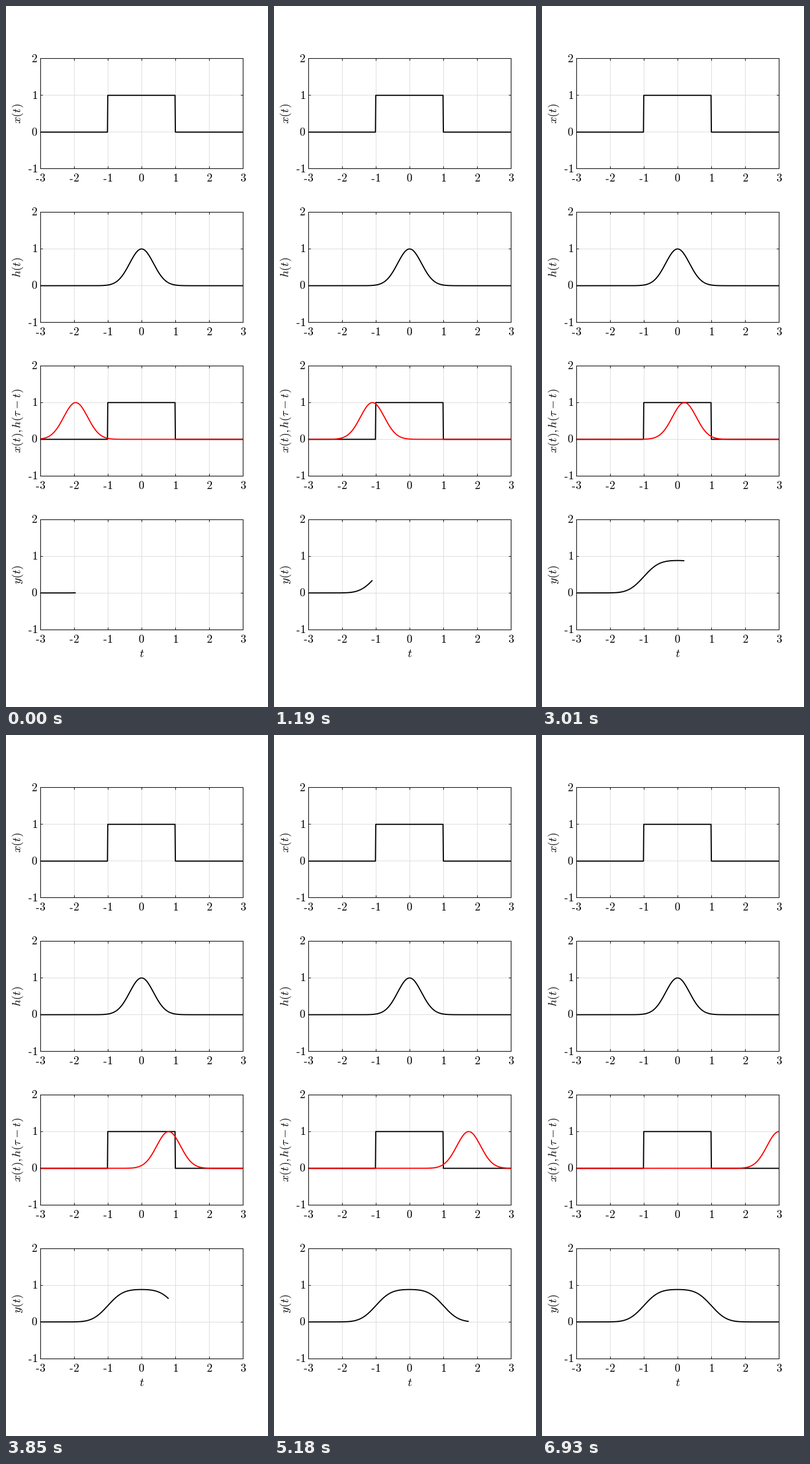
A matplotlib script for the animation above (7000 ms loop, 458 by 1222 pixels).

```python
import math

import matplotlib.pyplot as plt
import numpy as np
from matplotlib.animation import FuncAnimation
from matplotlib.lines import Line2D
from matplotlib.transforms import Affine2D

W, H, DPI = 458, 1222, 100
PT = 72 / DPI                       # points per pixel
LEFT, RIGHT = 59.8, 414.2
TOP, UNIT, STEP = 91.6, 64.1, 267.8  # first panel top, pixels per y unit, panel pitch
TICK_EM, LABEL_EM = 20, 20.6
FRAMES, INTERVAL = 100, 70

plt.rcParams["mathtext.fontset"] = "cm"
fig = plt.figure(figsize=(W / DPI, H / DPI), dpi=DPI, facecolor="white")


def put(x, y, s, em, **kw):
    """Math text centred on x with its baseline at y, in pixels from the top left."""
    fig.text(x / W, 1 - y / H, s, fontsize=em * PT, color="black",
             ha="center", va="baseline", **kw)


def number(x, y, n):
    """Tick number whose digit is centred on x; a hyphen serves as minus."""
    put(x, y, rf"$\mathrm{{{abs(n)}}}$", TICK_EM)
    if n < 0:
        mid = x - 0.44 * TICK_EM
        half = 0.133 * TICK_EM
        level = 1 - (y - 0.216 * TICK_EM) / H
        fig.add_artist(Line2D([(mid - half) / W, (mid + half) / W], [level, level],
                              color="black", lw=1.3 * PT, solid_capstyle="butt"))


def panel(k, label):
    top = TOP + STEP * k
    bottom = top + 3 * UNIT
    # Half a pixel up, so that the frame and grid snap to the pixel row they lie in.
    ax = fig.add_axes([LEFT / W, 1 - (bottom - 0.5) / H,
                       (RIGHT - LEFT) / W, 3 * UNIT / H])
    ax.set(xlim=(-3, 3), ylim=(-1, 2), xticks=range(-3, 4), yticks=range(-1, 3))
    ax.patch.set_visible(False)
    ax.set_axisbelow(True)
    ax.grid(color="#dcdcdc", lw=PT)
    ax.tick_params(direction="in", length=3.6 * PT, width=PT, top=True, right=True,
                   labelbottom=False, labelleft=False)
    for side in ax.spines.values():
        side.set_linewidth(1.1 * PT)

    for n in range(-3, 4):
        x = LEFT + (n + 3) * (RIGHT - LEFT) / 6
        number(x + (TICK_EM / 6 if n < 0 else 0), bottom + 22.4, n)
    for n in range(-1, 3):
        number(55 - TICK_EM / 4, top + (2 - n) * UNIT + 5.9, n)
    put(26.3, (top + bottom) / 2, label, LABEL_EM, rotation=90, rotation_mode="anchor")
    return ax


def curve(ax, x, y, color="black"):
    shifted = ax.transData + Affine2D().translate(0, -0.5)
    return ax.plot(x, y, color=color, lw=2 * PT, solid_capstyle="butt",
                   clip_on=False, transform=shifted)[0]


def bell(t):
    return np.exp(-4 * t ** 2)


def response(t):
    """Convolution of the unit pulse on [-1, 1] with the bell."""
    return math.sqrt(math.pi) / 4 * (math.erf(2 * (t + 1)) - math.erf(2 * (t - 1)))


t = np.linspace(-3, 3, 601)
pulse = ([-3, -1.01, -1, 0.99, 1, 3], [0, 0, 1, 1, 0, 0])
y = np.array([response(v) for v in t])

ax_x = panel(0, r"$x(t)$")
ax_h = panel(1, r"$h(t)$")
ax_both = panel(2, r"$x(t){,}\,h(\tau\:{-}\:t)$")
ax_y = panel(3, r"$y(t)$")
put(237, 1135.3, r"$t$", LABEL_EM)

curve(ax_x, *pulse)
curve(ax_h, t, bell(t))
curve(ax_both, *pulse)
moving = curve(ax_both, t, bell(t), "red")
output = curve(ax_y, [], [])


def draw(i):
    tau = -1.95 + 0.05 * i
    n = 106 + 5 * i
    moving.set_ydata(bell(t - tau))
    output.set_data(t[:n], y[:n])
    return moving, output


anim = FuncAnimation(fig, draw, frames=FRAMES, interval=INTERVAL,
                     init_func=lambda: draw(0), repeat=True, repeat_delay=0)
plt.show()
```
